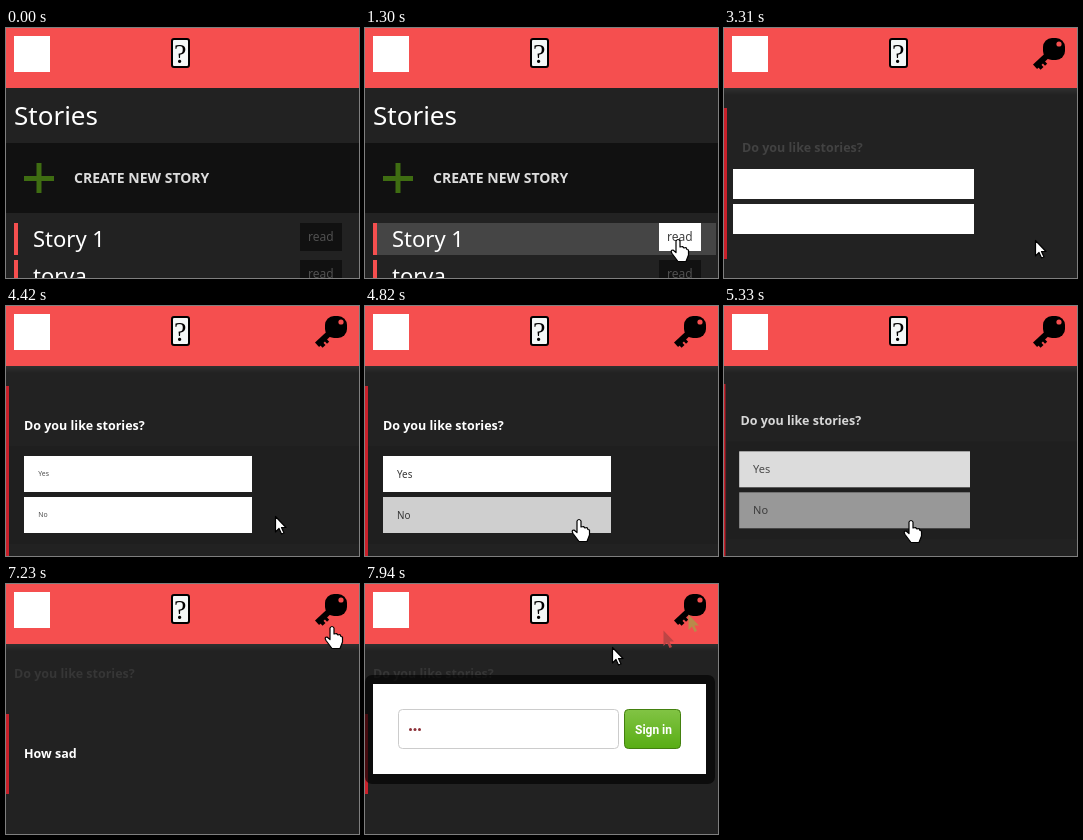
These frames come from a looping animation (353 by 250 pixels, 8000 ms). An HTML page with a canvas:

```html
<!DOCTYPE html>
<html lang="en">
<head>
<meta charset="utf-8">
<title>Stories</title>
<style>
  html, body { margin: 0; width: 100%; height: 100%; overflow: hidden; background: #222; }
  canvas { display: block; }
</style>
</head>
<body>
<canvas id="stage" width="353" height="250"></canvas>
<script>
const c = document.getElementById('stage').getContext('2d');
const SANS = '"Noto Sans", "Open Sans", sans-serif';
const BOLD = 'bold 12.5px "Open Sans", "Noto Sans", sans-serif';
const RED = '#f54f4f', BAR = '#c9202a';

const HAND = new Path2D('M-2 2Q0-1 2 2V8L4.5 7.5 6 9 8 8.5 9 10.5 10.5 11V16L8 22.500H0L-6 14.500Q-8 11-5 11L-2 13.500Z');
const ARROW = new Path2D('M.5.5V16L4 12.500 6.500 18 9 17 6.500 11.500H11Z');

// Pointer stops: time, x, y
const STOPS = [
  [500, 330, 238], [1300, 313, 211], [2100, 313, 211],
  [2100, 311, 212], [3310, 311, 212], [4110, 304, 218], [4420, 269, 210],
  [5020, 187, 214], [5930, 187, 214], [6130, 197, 209], [6430, 197, 209],
  [7230, 326, 42], [7340, 326, 42], [7540, 326, 28], [7740, 326, 28],
  [7740, 323, 30], [7840, 298, 46], [7940, 247, 63], [8000, 247, 63]
];

const mix = (a, b, p) => a + (b - a) * p;
const clamp = (v, lo, hi) => Math.min(hi, Math.max(lo, v));
const ease = p => p * p * (3 - 2 * p);
const grey = v => `rgb(${v},${v},${v})`;
// Progress in steps of 100 ms
const ramp = (t, start, steps) => clamp(Math.floor((t - start) / 100) / steps, 0, 1);

function box(x, y, w, h, fill) {
  c.fillStyle = fill;
  c.fillRect(x, y, w, h);
}

function rounded(x, y, w, h, r, fill, stroke, width = 1) {
  c.beginPath();
  c.roundRect(x, y, w, h, r);
  c.fillStyle = fill;
  c.fill();
  if (!stroke) return;
  c.strokeStyle = stroke;
  c.lineWidth = width;
  c.stroke();
}

function text(str, x, y, font, fill) {
  c.font = font;
  c.fillStyle = fill;
  c.fillText(str, x, y);
}

function vertical(y0, y1, from, to) {
  const g = c.createLinearGradient(0, y0, 0, y1);
  g.addColorStop(0, from);
  g.addColorStop(1, to);
  return g;
}

function shape(path, x, y, fill, stroke) {
  c.save();
  c.translate(x, y);
  c.fillStyle = fill;
  c.fill(path);
  if (stroke) {
    c.strokeStyle = stroke;
    c.lineWidth = 1.2;
    c.lineJoin = 'round';
    c.stroke(path);
  }
  c.restore();
}

function drawHeader() {
  box(0, 0, 353, 60, RED);
  box(8, 8, 36, 36, '#fff');
  rounded(166, 11, 17, 28, 2, '#f4f8f7', '#000', 2);
  text('?', 168, 35, '28px "Liberation Serif", serif', '#000');
}

function drawKey() {
  c.save();
  c.translate(330, 21);
  c.rotate(Math.PI * 0.76);
  box(6, -3, 20, 6, '#000');
  box(15, -6, 3, 4, '#000');
  box(20, -6, 4, 4, '#000');
  c.restore();
  rounded(319, 10, 22, 22, 9, '#000');
  c.beginPath();
  c.arc(335, 16, 2.6, 0, 7);
  c.fillStyle = RED;
  c.fill();
}

function drawStory(name, y, hover) {
  box(12, y, 339, 32, grey(mix(34, 69, hover)));
  box(8, y, 4, 32, RED);
  text(name, 27, y + 24, '22px ' + SANS, '#fff');
  box(294, y, 42, 28, grey(mix(17, 255, hover)));
  text('read', 302, y + 18, '12px ' + SANS, grey(mix(80, 65, hover)));
}

function drawList(t) {
  text('Stories', 8, 97, '26px ' + SANS, '#fff');
  box(0, 115, 353, 70, '#111');
  box(18, 148, 30, 5, '#3f6d12');
  box(30.5, 135, 5, 30, '#3f6d12');
  text('CREATE NEW STORY', 68, 155, 'bold 14px ' + SANS, '#ddd');
  drawStory('Story 1', 195, ramp(t, 900, 4));
  drawStory('torva', 232, 0);
}

function drawAnswer(label, x, y, w, h, size, shade, ink) {
  box(x, y, w, h, grey(shade));
  if (size > 0) text(label, x + 15 - size * 0.1, y + 18 + size * 0.36, `${size}px ${SANS}`, grey(ink));
}

function drawQuestion(t) {
  box(0, 60, 353, 7, vertical(60, 67, '#303030', '#222'));
  if (t < 3310) return;

  const open = ease(ramp(t, 3310, 8));
  const leave = ease(ramp(t, 5130, 8));
  const light = t < 5130 ? mix(66, 255, ramp(t, 3310, 8)) : mix(255, 54, ramp(t, 5130, 10));

  box(0, 80 - 13 * leave, clamp(3 - 10 * leave, 0, 3), mix(151, 172, open), BAR);

  if (leave < 1) {
    const snapped = 3310 + Math.floor((t - 3310) / 100) * 100;
    const size = clamp((snapped - 3490) * 0.0075, 0, 11);
    const hover = ramp(t, 4520, 5);
    const x = mix(9, 18, open) - 18 * leave;
    const w = mix(241, 228, open) + 18 * leave;
    const h = mix(30, 36, open);
    const y = mix(141, 150, open) - 30 * leave;
    const ink = mix(130, 45, size / 11);
    c.globalAlpha = 1 - leave;
    box(3, y - 10, 350, 98, `rgba(0,0,0,${0.1 * open})`);
    drawAnswer('Yes', x, y, w, h, size, 255, ink);
    drawAnswer('No', x, y + h + 5, w, h, size, mix(255, 175, hover), ink);
    c.globalAlpha = 1;
  }
  text('Do you like stories?', 18 - 10 * leave, 124 - 30 * leave, BOLD, grey(light));

  if (leave > 0) {
    const top = 290 - 160 * leave;
    box(0, top, 3, 80, BAR);
    text('How sad', 18, top + 44, BOLD, grey(mix(60, 255, ramp(t, 5330, 8))));
  }
}

function drawSignIn(t) {
  c.globalAlpha = (ramp(t, 7740, 2) * 2 + 1) / 3;
  rounded(0, 91, 350, 109, 7, 'rgba(0,0,0,.65)');
  box(8, 100, 333, 90, '#fff');
  rounded(33.5, 125.5, 220, 39, 4, '#fff', '#ccc');
  for (let i = 0; i < 3; i++) rounded(44 + i * 4.5, 144, 3, 3, 1.5, '#8c3038');
  rounded(259.5, 125.5, 56, 39, 4, vertical(125, 165, '#82c445', '#58ad14'), '#43800f');
  text('Sign in', 270, 150, 'bold 12px Roboto, sans-serif', '#fff');
  c.globalAlpha = 1;
}

function drawPointer(t) {
  if (t < 500) return;
  const i = STOPS.findLastIndex(s => s[0] <= t);
  const [t0, x0, y0] = STOPS[i];
  const [t1, x1, y1] = STOPS[Math.min(i + 1, STOPS.length - 1)];
  const p = ramp(t, t0, (t1 - t0) / 100);
  const x = Math.round(mix(x0, x1, p)), y = Math.round(mix(y0, y1, p));
  if (t >= 7840) shape(ARROW, 323, 30, '#b98a4a');
  if (t >= 7940) shape(ARROW, 298, 46, '#bd4545');
  const hand = t < 2100 ? y < 228 : t < 6030 ? x < 246 : y < 56 && t < 7740;
  shape(hand ? HAND : ARROW, x, y, '#fff', '#000');
}

function draw() {
  const t = performance.now() % 8000;
  box(0, 0, 353, 250, '#222');
  drawHeader();
  if (t < 2100) {
    drawList(t);
  } else {
    drawKey();
    drawQuestion(t);
  }
  if (t >= 7740) drawSignIn(t);
  drawPointer(t);
  requestAnimationFrame(draw);
}
draw();
</script>
</body>
</html>
```
